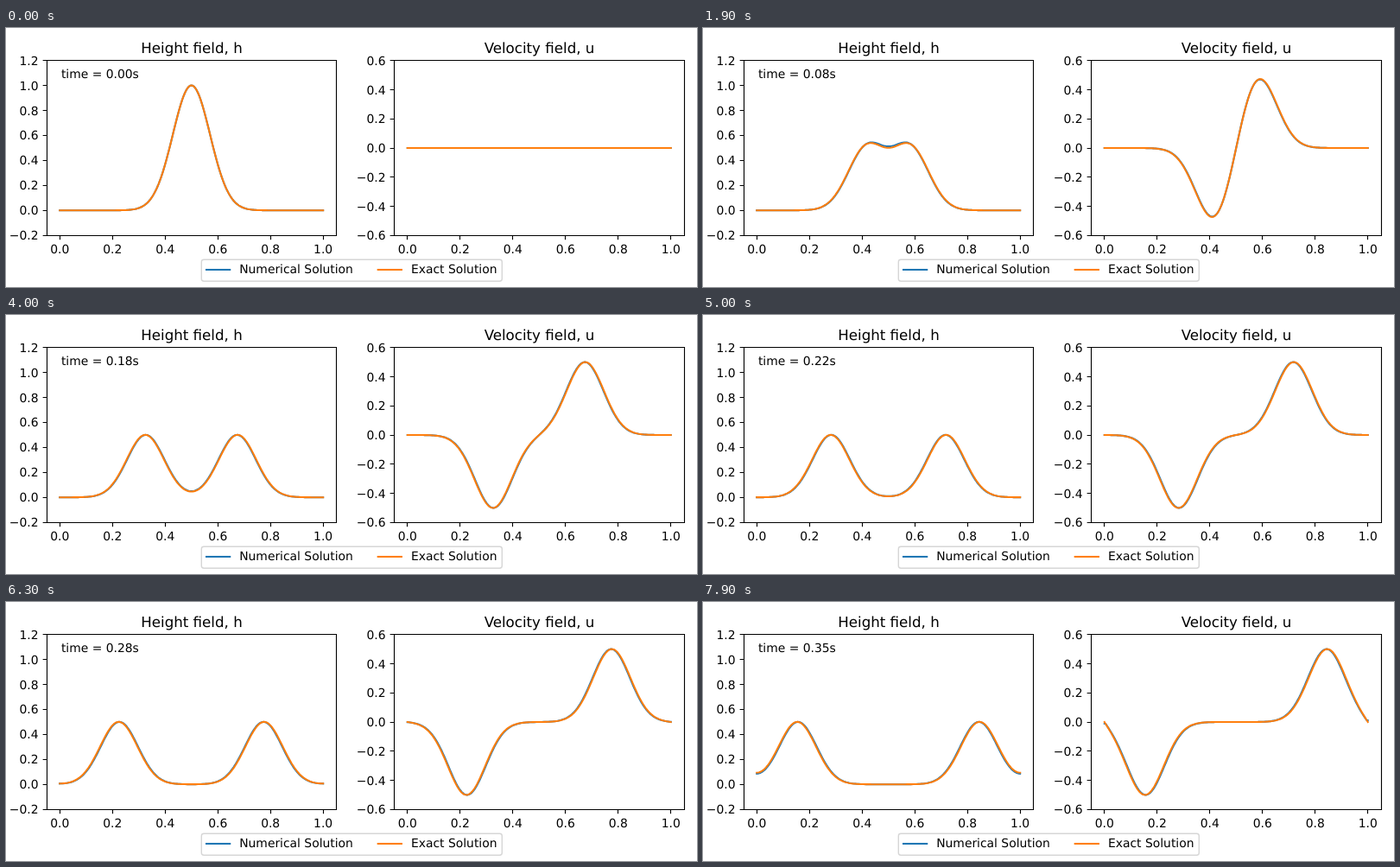
Write an HTML page that moves like this. It is 800 px wide and 300 px high and loops after 8000 ms.

```html
<!DOCTYPE html>
<html lang="en">
<head>
<meta charset="utf-8">
<title>Wave solution</title>
<style>
  html, body { margin: 0; width: 100%; height: 100%; overflow: hidden; background: #fff; }
  svg { display: block; font: 13.89px "DejaVu Sans", sans-serif; text-rendering: geometricPrecision; }
  .title { font-size: 16.67px; }
  .axis { fill: none; stroke: #000; stroke-width: 1.11; }
  .curve { fill: none; stroke-width: 2.083; stroke-linecap: square; stroke-linejoin: round; }
</style>
</head>
<body>
<svg id="stage" width="800" height="300" viewBox="0 0 800 300"></svg>
<script>
const BLUE = '#1f77b4', ORANGE = '#ff7f0e';
const TOP = 37.5, BOTTOM = 240.5, UNIT = 304.9;
const STEPS = 80, STEP_MS = 100, DT = 0.00438, CELLS = 200;
const stage = document.getElementById('stage');

function add(tag, attrs, text = '') {
  const el = document.createElementNS('http://www.w3.org/2000/svg', tag);
  for (const key in attrs) el.setAttribute(key, attrs[key]);
  el.textContent = text;
  stage.append(el);
  return el;
}
const label = (x, y, text, anchor = 'start', cls = '') =>
  add('text', { x, y, 'text-anchor': anchor, class: cls }, text);
const curve = (stroke, d = '') => add('path', { class: 'curve', stroke, d });
const snap = v => Math.floor(v) + 0.5;

function makePlot({ title, left, right, x0, y0, scale, min, max }) {
  const px = x => x0 + x * UNIT;
  const py = y => y0 - y * scale;
  const lines = [curve(BLUE), curve(ORANGE)];
  let d = `M${left} ${TOP}H${right}V${BOTTOM}H${left}Z`;
  for (let i = 0; i <= 5; i++) {
    const x = px(i / 5);
    d += `M${snap(x)} ${BOTTOM}v4.86`;
    label(x, 261.2, (i / 5).toFixed(1), 'middle');
  }
  for (let i = min; i <= max; i++) {
    const y = py(i / 5);
    d += `M${left} ${snap(y)}h-4.86`;
    label(left - 10, y + 5.1, (i / 5).toFixed(1).replace('-', '\u2212'), 'end');
  }
  add('path', { class: 'axis', d });
  label((left + right) / 2, 29.2, title, 'middle', 'title');

  return fields => fields.forEach((field, k) => {
    const points = [];
    for (let i = 0; i <= CELLS; i++) {
      const x = i / CELLS;
      points.push(px(x).toFixed(2) + ' ' + py(field(x)).toFixed(2));
    }
    lines[k].setAttribute('d', 'M' + points.join('L'));
  });
}

const drawHeight = makePlot({ title: 'Height field, h', left: 47.5, right: 382.5,
  x0: 62.25, y0: 211.2, scale: 144.7, min: -1, max: 6 });
const drawVelocity = makePlot({ title: 'Velocity field, u', left: 449.5, right: 785.5,
  x0: 464.8, y0: 139, scale: 168.9, min: -3, max: 3 });
const clock = label(63.9, 58.2, '');

add('rect', { x: 226.3, y: 268.2, width: 348, height: 25, rx: 2.8,
  fill: '#fff', stroke: '#ccc', 'stroke-opacity': 0.8, 'stroke-width': 1.39 });
curve(BLUE, 'M232 280h27.2');
curve(ORANGE, 'M430.7 280h27.2');
label(270.2, 284.4, 'Numerical Solution');
label(469, 284.4, 'Exact Solution');

// Gaussian pulse plus its mirror images in the walls at x = 0 and x = 1
const pulse = x => [-0.5, 0.5, 1.5].reduce((sum, s) => sum + Math.exp(-100 * (x - s) ** 2), 0);
const height = ct => x => (pulse(x - ct) + pulse(x + ct)) / 2;
const velocity = ct => x => (pulse(x - ct) - pulse(x + ct)) / 2;

let shown = -1;
function frame(now) {
  const step = Math.floor(now / STEP_MS) % STEPS;
  if (step !== shown) {
    shown = step;
    const t = step * DT;
    // the numerical wave lags a little and keeps half a cell off the walls
    const late = step ? t - 0.001 - 0.005 * t : 0;
    const lateVelocity = velocity(late);
    drawHeight([height(late), height(t)]);
    drawVelocity([x => lateVelocity(Math.min(0.996, Math.max(0.004, x))), velocity(t)]);
    clock.textContent = `time = ${t.toFixed(2)}s`;
  }
  requestAnimationFrame(frame);
}
const start = performance.now();
const tick = () => frame(performance.now() - start);
window.requestAnimationFrame = (raf => () => raf.call(window, tick))(window.requestAnimationFrame);
tick();
</script>
</body>
</html>
```
